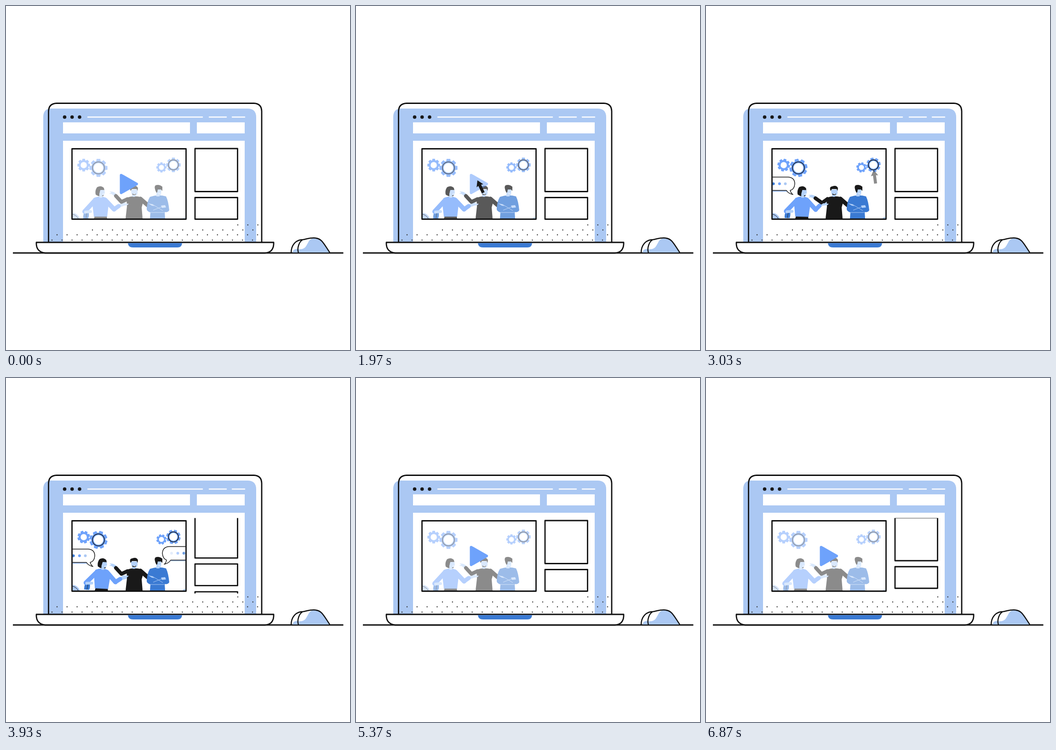
An HTML page for the animation above (6930 ms loop, 748 by 748 pixels).

```html
<!DOCTYPE html>
<html lang="en">
<head>
<meta charset="utf-8">
<title>Laptop video</title>
<style>
html, body { margin: 0; width: 100%; height: 100%; overflow: hidden; background: #fff; }
svg { display: block; width: 100vw; height: 100vh; }
.pale { fill: #abc8f3; }
.skin { fill: #b4d2fa; }
.sky { fill: #6ea2fb; }
.blue { fill: #3a7ad3; }
.ink { fill: #191919; }
.white { fill: #fff; }
.line { fill: none; stroke: #111; stroke-width: 2.8; stroke-linejoin: round; }
.thin { fill: none; stroke: #191919; stroke-width: 1.5; stroke-linejoin: round; }
.limb { fill: none; stroke-linecap: round; stroke-linejoin: round; }
</style>
</head>
<body>
<svg viewBox="0 0 748 748" xmlns="http://www.w3.org/2000/svg">
  <defs>
    <clipPath id="videoClip"><rect x="145" y="312" width="245.5" height="150"/></clipPath>
    <clipPath id="listClip"><rect x="405" y="304.5" width="105" height="164"/></clipPath>
  </defs>
  <rect width="748" height="748" fill="#fff"/>

  <path class="pale" d="M81 514V241Q81 223 99 223H525Q544 223 544 242V514Z"/>
  <path class="white" d="M124 253H400V277H124ZM415 253H519V277H415ZM124 293H519V514H124Z"/>
  <path d="M178 241.5H427M442 241.5H479M492 241.5H519" stroke="#fff" stroke-width="2.5" stroke-linecap="round"/>
  <g class="ink"><circle cx="127.5" cy="241.5" r="3.8"/><circle cx="143.7" cy="241.5" r="3.8"/><circle cx="160" cy="241.5" r="3.8"/></g>
  <g id="dots" fill="#333"></g>
  <path class="line" d="M92.5 514V229Q93 212 110 211.5H539Q555.5 212 556 229V514"/>
  <path class="line" d="M15 537H733.5" stroke-width="2.5"/>
  <path class="line" style="fill:#fff" d="M66 514H582V518Q581 536 563 537H85Q67 535 66 518Z"/>
  <path class="blue" d="M265 515.5H383Q382 525 373 525H276Q266 525 265 515.5Z"/>

  <path class="pale" d="M623 536Q625 526 638 529C650 529 652 523 656 516Q660 506 669 505Q684 503 691 515L704 536Z"/>
  <path class="line" style="stroke-width:2.4" d="M620 537C620 520 630 508 646 508C656 506 664 503 673 504.500C687 506 691 517 704 536M636 537C632 526 638 511 646 508"/>

  <g clip-path="url(#videoClip)">
    <g id="scene">
      <g id="gears"></g>
      <path class="pale" d="M145 450Q155 450 161 462H145Z"/>
      <path class="thin" style="stroke-width:1" d="M145 453Q152 454 157 462"/>
      <path class="pale" d="M384 462Q386 458 391 459V462Z"/>

      <g id="woman">
        <path class="blue" d="M168 462Q167 447 176 443Q183 449 179 462Z"/>
        <path class="thin" style="stroke-width:.8" d="M174 462L176 447"/>
        <path class="ink" d="M193 456H219L220 463H191Z"/>
        <path class="limb" d="M194 422L171 447" stroke="#6ea2fb" stroke-width="10"/>
        <path class="limb" d="M173 448L184 447" stroke="#b4d2fa" stroke-width="6"/>
        <g id="reach">
          <path class="skin" d="M244 432L254 428L262 427L257 430L267 431L258 434L246 438Z"/>
          <path class="limb" d="M235 442L245 435" stroke="#6ea2fb" stroke-width="9"/>
        </g>
        <path class="limb" d="M216 422L235 442" stroke="#6ea2fb" stroke-width="10"/>
        <path class="sky" d="M190 418Q204 411 218 417L223 433L220 458H191L188 432Z"/>
        <path class="ink" d="M198 394Q207 389 213 396L214 404L212 413Q203 416 195 410Q193 401 198 394Z"/>
        <path class="skin" d="M205 399L213 398L215 405L213 411L209 412V417H203V408Z"/>
        <path class="ink" d="M202 395Q211 392 214 400L205 400L203 407Z"/>
        <path d="M210 409L213 408" stroke="#fff"/>
      </g>

      <g id="wave">
        <path class="skin" d="M236 414L230 409L224 408L229 406L225 403L233 404L240 408Z"/>
        <path class="limb" d="M239 413L251 426L264 420" stroke="#191919" stroke-width="8"/>
      </g>
      <path class="limb" d="M292 419L308 433" stroke="#191919" stroke-width="9"/>
      <path class="ink" d="M262 417Q278 411 295 416L298 427L295 438L297 462H260L263 436Z"/>
      <path class="skin" d="M272 399H286V407Q285 412 282 412V414Q278 416 274 414V410Q272 408 272 399Z"/>
      <path class="ink" d="M271 402Q267 393 275 392Q284 389 287 396L286 402L284 398H274Z"/>
      <path class="ink" d="M274 408L279 409L283 408L281 411H276Z"/>
      <path d="M277 409H281" stroke="#fff"/>
      <path class="skin" d="M249 433L255 429L267 430L264 433L254 434Z"/>

      <path class="blue" d="M313 415Q331 409 348 414Q353 424 355 444Q353 449 345 448L346 462H313L314 449Q305 446 306 440Q307 424 313 415Z"/>
      <path class="skin" d="M327 399L338 398L337 410L334 412V414H327Z"/>
      <path class="ink" d="M327 406Q321 394 325 390Q333 387 340 393L340 402L337 399H330L329 405Z"/>
      <path d="M331 408H336" stroke="#fff"/>
      <path class="skin" d="M309 429L318 431L323 435L317 434ZM337 434L346 433L348 438L339 439Z"/>
      <path d="M318 431L341 445M320 444L338 437M314 449H344" fill="none" stroke="#abc8f3" stroke-width="1"/>
    </g>

    <g id="leftBubble">
      <path class="pale" d="M140 375H181V404H140Z"/>
      <path class="thin" style="fill:#fff" d="M140 372H179Q193 373 193 387Q192 399 183 401Q185 407 189 410Q179 408 175 401H140Z"/>
      <g id="leftDots"><circle class="blue" cx="146.500" cy="386.500" r="3"/><circle class="sky" cx="159.800" cy="386.500" r="3"/><circle class="pale" cx="172.500" cy="386.500" r="3"/></g>
    </g>
    <g id="rightBubble">
      <path class="pale" d="M358 370H395V398.500H358Z"/>
      <path class="thin" style="fill:#fff" d="M395 366.500H355Q341 367 340 381Q341 393 349 396Q348 402 344 405Q354 403 358 396H395Z"/>
      <g id="rightDots"><circle class="pale" cx="360" cy="381" r="3"/><circle class="sky" cx="373.500" cy="381" r="3"/><circle class="blue" cx="386.700" cy="381" r="3"/></g>
    </g>
    <path id="play" d="M250.500 368L284 387L250.500 406Z" fill="#6ea2fb" stroke="#6ea2fb" stroke-width="6" stroke-linejoin="round"/>
  </g>
  <rect class="line" x="143.500" y="310.500" width="248" height="153"/>

  <g clip-path="url(#listClip)">
    <g id="list" class="line">
      <rect x="411" y="310" width="92.500" height="93.500"/>
      <rect x="411" y="416.500" width="92.500" height="47"/>
      <rect x="411" y="477" width="92.500" height="93.500"/>
    </g>
  </g>
  <path id="cursor" class="ink" d="M0 0L8 13L3.300 12L3.300 30H-3.300V12L-8 13Z"/>
</svg>
<script>
const LOOP = 6930;
const $ = id => document.getElementById(id);
const clamp = v => Math.max(0, Math.min(1, v));
const ramp = (t, a, b) => clamp((t - a) / (b - a));
const ease = p => p * p * (3 - 2 * p);
const bump = (t, a, b) => Math.sin(Math.PI * ramp(t, a, b));
const mix = (a, b, p) => a + (b - a) * p;
const fade = (id, v) => $(id).setAttribute('opacity', v);
const move = (id, v) => $(id).setAttribute('transform', v);

function gearPath(outer, root) {
  let d = '';
  for (let i = 0; i < 8; i++) {
    [[-.31, root], [-.2, outer], [.2, outer], [.31, root]].forEach(([da, r]) => {
      const a = i * Math.PI / 4 + da;
      d += `${d ? 'L' : 'M'}${(r * Math.cos(a)).toFixed(2)} ${(r * Math.sin(a)).toFixed(2)}`;
    });
  }
  return d + 'Z';
}

// x, y, outer radius, hole radius, dark ring radius, direction
const gears = [
  [169, 346, 14, 6.8, 0, 1], [201, 352, 20, 10.5, 13, -1],
  [338, 351, 11.3, 5.5, 0, 1], [364, 345.500, 16, 8.5, 11, -1]
];
$('gears').innerHTML = gears.map(([x, y, r, hole, ring], i) =>
  `<g transform="translate(${x} ${y})"><path id="gear${i}" class="sky" d="${gearPath(r, r * .78)}"/>
  <circle class="white" r="${hole}"/>${ring ? `<circle class="thin" r="${ring}" stroke-width="1.8"/>` : ''}</g>`).join('');

// x of the first dot, y, count
$('dots').innerHTML = [[504, 476, 3], [188, 487, 17], [111, 497.5, 21], [100, 509, 21]].map(([x, y, n]) =>
  Array.from({ length: n }, (_, i) => `<circle cx="${x + i * 21.8}" cy="${y}" r="1.2"/>`).join('')).join('');

function sequence(id, t, starts) {
  [...$(id).children].forEach((dot, i) =>
    dot.setAttribute('opacity', ramp(t, starts[i], starts[i] + 250)));
}

function draw(t) {
  const playing = ease(ramp(t, 1790, 2180)) * (1 - ease(ramp(t, 4580, 5230)));
  fade('scene', .5 + playing / 2);
  fade('play', 1 - playing);

  const turn = 45 * ramp(t, 2130, 5230);
  gears.forEach((g, i) => move('gear' + i, `rotate(${turn * g[5]})`));

  const lean = ease(ramp(t, 2400, 3700)) * (1 - ease(ramp(t, 4050, 4600)));
  const lift = bump(t, 2600, 3460);
  move('woman', `translate(${2 * lean + 2 * lift} 0) rotate(${3 * lean} 205 460)`);
  move('reach', `rotate(${-12 * lift} 235 442)`);
  move('wave', `rotate(${-12 * lift} 262 420)`);

  const bubblesOut = 1 - ramp(t, 4800, 5220);
  fade('leftBubble', ramp(t, 2300, 2500) * bubblesOut);
  fade('rightBubble', ramp(t, 3500, 3750) * bubblesOut);
  sequence('leftDots', t, [2400, 2550, 2700]);
  fade('leftDots', 1 - ramp(t, 4250, 4600));
  sequence('rightDots', t, [3850, 3800, 3750]);

  const scroll = -24 * (bump(t, 3772, 4721) + bump(t, 6170, 6935));
  move('list', `translate(0 ${scroll})`);

  const away = t < 2000 ? 1 - ease(ramp(t, 850, 1350)) : ease(ramp(t, 2810, 3250));
  move('cursor', `translate(${mix(264, 464, away)} ${mix(379, 334, away)}) rotate(${mix(-25, 9, away)})`);
  fade('cursor', 1 - away);
}

const start = performance.now();
function tick() {
  draw((performance.now() - start) % LOOP);
  requestAnimationFrame(tick);
}
tick();
</script>
</body>
</html>
```
